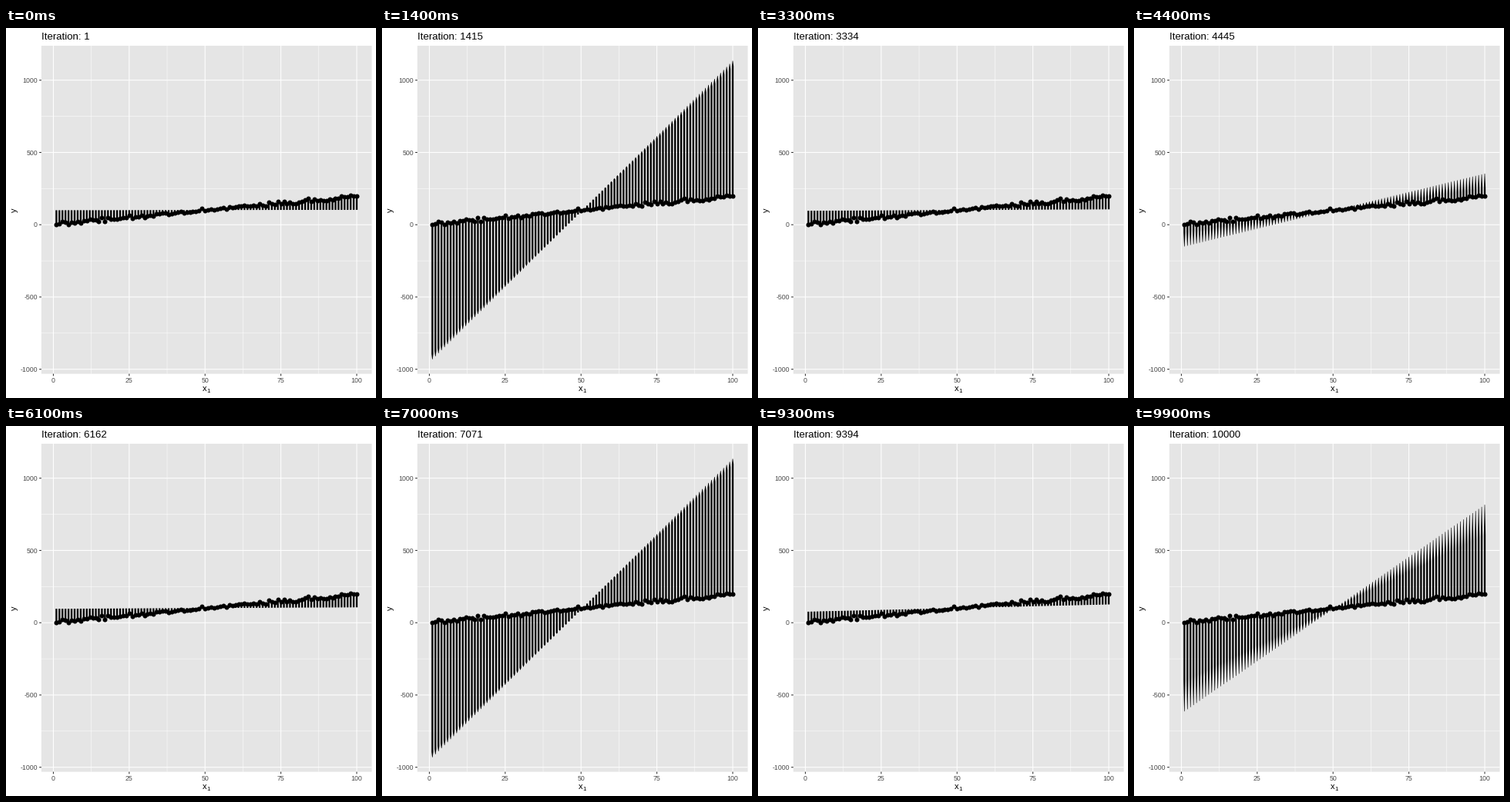
These frames come from a looping animation (480x480 px, 10000 ms). A matplotlib script:

```python
import numpy as np
import matplotlib.pyplot as plt
from matplotlib.animation import FuncAnimation
from matplotlib.collections import PolyCollection
from matplotlib.patches import Rectangle

plt.rcParams["font.family"] = "Liberation Sans"

SIZE, FRAMES, PERIOD = 480, 100, 28
LEFT, RIGHT, TOP, BOTTOM = 45.9, 474.5, 23, 448.6
BAR, PEAK = 2.3, 20.86

# Noisy linear observations
rng = np.random.default_rng(4)
X = np.arange(1, 101)
Y = 4 + 1.94 * X + rng.normal(0, 7, X.size)


def px(x):
    return 61.45 + 3.9355 * np.asarray(x, float)


def py(y):
    return 255.2 - 0.1875 * np.asarray(y, float)


fig = plt.figure(figsize=(SIZE / 72, SIZE / 72), dpi=72, facecolor="white")
ax = fig.add_axes([0, 0, 1, 1])
ax.set(xlim=(0, SIZE), ylim=(SIZE, 0))
ax.axis("off")
ax.add_patch(Rectangle((LEFT, TOP), RIGHT - LEFT, BOTTOM - TOP,
                       fc="#e5e5e5", lw=0, zorder=0, snap=False))


def line(xs, ys, color, width):
    ax.plot(xs, ys, color=color, lw=width, solid_capstyle="butt", snap=False, zorder=1)


def label(x, y, text, size=8.8, color="#4d4d4d", **kw):
    kw.setdefault("va", "baseline")
    return ax.text(x, y, text, fontsize=size, color=color, **kw)


def vgrid(x, width):
    line([px(x)] * 2, [TOP, BOTTOM], "white", width)


def hgrid(y, width):
    line([LEFT, RIGHT], [py(y)] * 2, "white", width)


for x in np.arange(12.5, 100, 25):
    vgrid(x, 0.53)
for y in range(-750, 1000, 500):
    hgrid(y, 0.53)
for x in range(0, 101, 25):
    vgrid(x, 1.07)
    line([px(x)] * 2, [BOTTOM, BOTTOM + 2.75], "#333333", 1.07)
    label(px(x), 460, str(x), ha="center")
for y in range(-1000, 1001, 500):
    hgrid(y, 1.07)
    line([LEFT - 2.75, LEFT], [py(y)] * 2, "#333333", 1.07)
    label(41, py(y) + 3.1, str(y), ha="right")

label(255, 471, "x", 11, "black")
label(260.5, 473, "1", 7.7, "black")
label(11.2, 236, "y", 11, "black", rotation=90, ha="center", va="center")
title = label(45.8, 15, "", 13.2, "black")

bars = PolyCollection([], facecolors="black", linewidths=0, snap=False, zorder=3)
ax.add_collection(bars, autolim=False)
ax.plot(px(X), py(Y), "o", color="black", ms=6, mew=0, snap=False, zorder=4)


def update(i):
    # The fitted slope swings up to a sharp peak once per period
    dist = abs(i % PERIOD - PERIOD / 2)
    slope = PEAK / (1 + 0.4445 * dist ** 2.8)

    # Bars are pointed only while the fit is steeper than the data
    steep = slope > 2
    taper = 0.04 + 0.3 * dist if steep else 0
    half = BAR / 2
    end = half * (0.25 if steep else 1)

    base, tip = py(Y), py(101.5 + slope * (X - 50.5))
    neck = tip - taper * (tip - base)
    cx = px(X)
    outline = [(cx - half, base), (cx - half, neck), (cx - end, tip),
               (cx + end, tip), (cx + half, neck), (cx + half, base)]
    bars.set_verts(np.array(outline).transpose(2, 0, 1))
    title.set_text(f"Iteration: {1 + 101 * i}")
    return bars, title


anim = FuncAnimation(fig, update, frames=FRAMES, interval=100, repeat=True, repeat_delay=0)
plt.show()
```
